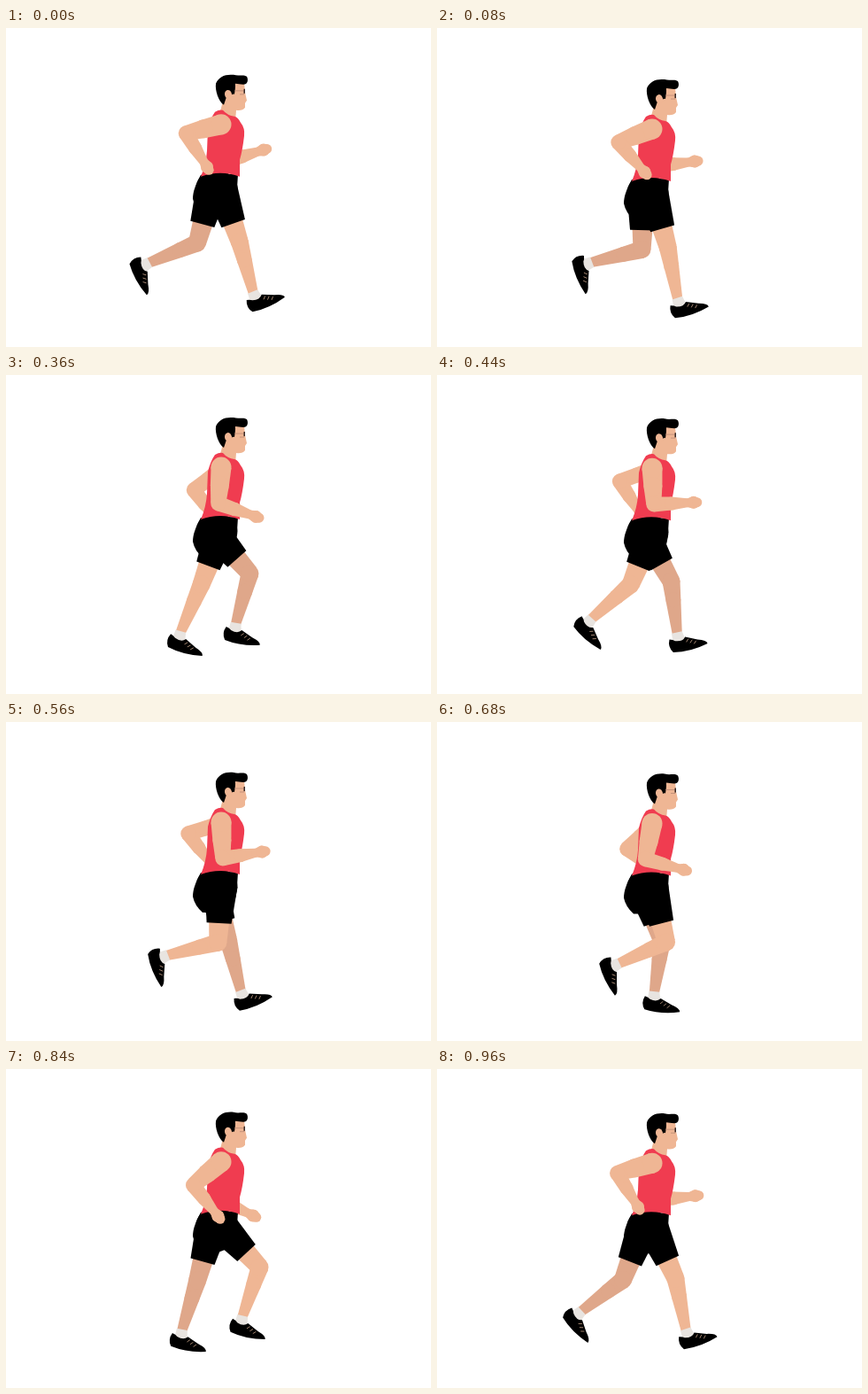
An HTML page with a canvas that plays this animation: 480 by 360 pixels, repeating every 1000 ms.

```html
<!DOCTYPE html>
<html lang="en">
<head>
<meta charset="utf-8">
<title>Runner</title>
<style>
html, body { margin: 0; width: 100%; height: 100%; overflow: hidden; background: #fff; }
canvas { display: block; }
</style>
</head>
<body>
<canvas id="stage" width="480" height="360"></canvas>
<script>
const ctx = document.getElementById('stage').getContext('2d');
const LOOP = 1000, STEP = 40;
const FAR_SHIFT = .49; // the far limbs run the same cycle half a stride later
const SKIN = '#efb694', SHADE = '#dfa78a', SHIRT = '#f03c50', BLACK = '#000', SOCK = '#e8e4e0';
const THIGH = 64, SHIN = 60, UPPER = 41, FORE = 45, HEM = 42;

// Joint angles in degrees, evenly spaced over one stride; 0 hangs down, positive swings forward.
const thighKeys = [19, 16, 18, -9, -24, -14, 4, 18, 44, 34];
const shinKeys = [15, 8, -14, -13, -34, -70, -75, -62, -33, 0];
const footKeys = [-23, -14, 12, 7, 26, 65, 68, 62, 28, -6];
const foreKeys = [32, 44, 57, 60, 80, 108, 90, 70, 44, 34];

const wave = p => Math.cos(2 * Math.PI * p);
const bob = p => -.4 + 5.8 * wave(2 * (p - .135));
const upperArm = p => -31 - 40 * wave(p) - 5 * wave(2 * p);

// Periodic Catmull-Rom curve through evenly spaced keys.
function cycle(keys, p) {
  const n = keys.length, x = (p % 1) * n, i = Math.floor(x), u = x - i;
  const [a, b, c, d] = [-1, 0, 1, 2].map(k => keys[(i + k + n) % n]);
  return b + u / 2 * (c - a + u * (2 * a - 5 * b + 4 * c - d + u * (3 * (b - c) + d - a)));
}

function reach([x, y], angle, len) {
  const r = angle * Math.PI / 180;
  return [x + len * Math.sin(r), y + len * Math.cos(r)];
}

function shape(d, color) {
  ctx.fillStyle = color;
  ctx.fill(new Path2D(d));
}

function line(d, color) {
  ctx.strokeStyle = color;
  ctx.lineWidth = .8;
  ctx.stroke(new Path2D(d));
}

// Tapered chain of [point, width] pairs, with a flat end.
function tube(color, ...parts) {
  ctx.fillStyle = color;
  for (let i = 0; i < parts.length - 1; i++) {
    const [[x, y], w] = parts[i], [[X, Y], W] = parts[i + 1];
    const len = Math.hypot(X - x, Y - y);
    const nx = (y - Y) / len / 2, ny = (X - x) / len / 2;
    ctx.beginPath();
    ctx.moveTo(x + nx * w, y + ny * w);
    ctx.lineTo(X + nx * W, Y + ny * W);
    ctx.lineTo(X - nx * W, Y - ny * W);
    ctx.lineTo(x - nx * w, y - ny * w);
    ctx.fill();
    ctx.beginPath();
    ctx.arc(x, y, w / 2, 0, 7);
    ctx.fill();
  }
}

function foot([x, y], angle) {
  ctx.save();
  ctx.translate(x, y);
  ctx.rotate(angle * Math.PI / 180);
  shape('M-6-2L6-2L8 9L-7 10Z', SOCK);
  shape('M-10 4Q-6 5-4 7Q4 10 8 5L21 11Q31 14 31 18Q10 23-9 19Q-14 12-10 4Z', BLACK);
  line('M11 8l-3 3M15 10l-3 3M19 12l-3 3', '#b9977f');
  ctx.restore();
}

function leg(hip, p, color) {
  const thigh = cycle(thighKeys, p), shin = cycle(shinKeys, p);
  const knee = reach(hip, thigh, THIGH), ankle = reach(knee, shin, SHIN);
  tube(color, [hip, 28], [knee, 20], [reach(knee, shin, 21), 17], [ankle, 11]);
  foot(ankle, cycle(footKeys, p));
  tube(BLACK, [hip, 37], [reach(hip, thigh, HEM), 28]);
}

function arm(shoulder, p, width) {
  const upper = upperArm(p), fore = cycle(foreKeys, p);
  const elbow = reach(shoulder, upper, UPPER);
  const along = d => reach(elbow, fore, d);
  tube(SKIN, [shoulder, width], [reach(shoulder, upper, UPPER / 2), width - 2], [elbow, 17],
    [along(20), 15], [along(FORE - 7), 10], [along(FORE), 14], [along(FORE + 4), 11], [along(FORE + 7), 8]);
}

function head() {
  shape('M245 84L258 61L269 63L270 74L272 83L270 86L270 91Q267 95 260 94L259 106L246 102L242 95Z', SKIN);
  shape('M246 88C240 84 236 72 237 64C240 56 248 53 257 54C263 56 268 53 272 56' +
    'C274 60 273 65 268 65C264 65 262 64 259 64L258 75L254 77L249 79Z', BLACK);
  ctx.fillStyle = SKIN;
  ctx.beginPath();
  ctx.ellipse(251, 76, 4, 5, -.2, 0, 7);
  ctx.fill();
  shape('M254 67L259 66L258 76L255 75Z', BLACK);
  line('M258 72H269V76H264', '#b98a74');
  shape('M268.5 70h1.5v5h-1.5z', '#3a2a26');
}

function torso() {
  shape('M220 167C214 178 211 186 211 194Q213 204 222 212L240 212L256 206Q261 192 261 182L262 166Z', BLACK);
  head();
  shape('M236 96Q241 93 245 94Q250 100 258 101Q262 102 265 108Q270 114 269 123Q267 140 264 150' +
    'L264 169Q242 161 220 169Q226 155 227 140L228 115Q231 103 236 96Z', SHIRT);
}

function draw(p) {
  const far = p + FAR_SHIFT;
  ctx.fillStyle = '#fff';
  ctx.fillRect(0, 0, 480, 360);
  ctx.save();
  ctx.translate(0, bob(p));
  arm([245, 111], far, 19);
  leg([233, 182], far, SHADE);
  leg([243, 182], p, SKIN);
  torso();
  arm([243, 110], p, 23);
  ctx.restore();
}

const start = performance.now();
function tick(now) {
  const t = Math.max(0, now - start) % LOOP;
  draw(Math.floor(t / STEP) * STEP / LOOP);
  requestAnimationFrame(tick);
}
draw(0);
requestAnimationFrame(tick);
</script>
</body>
</html>
```
